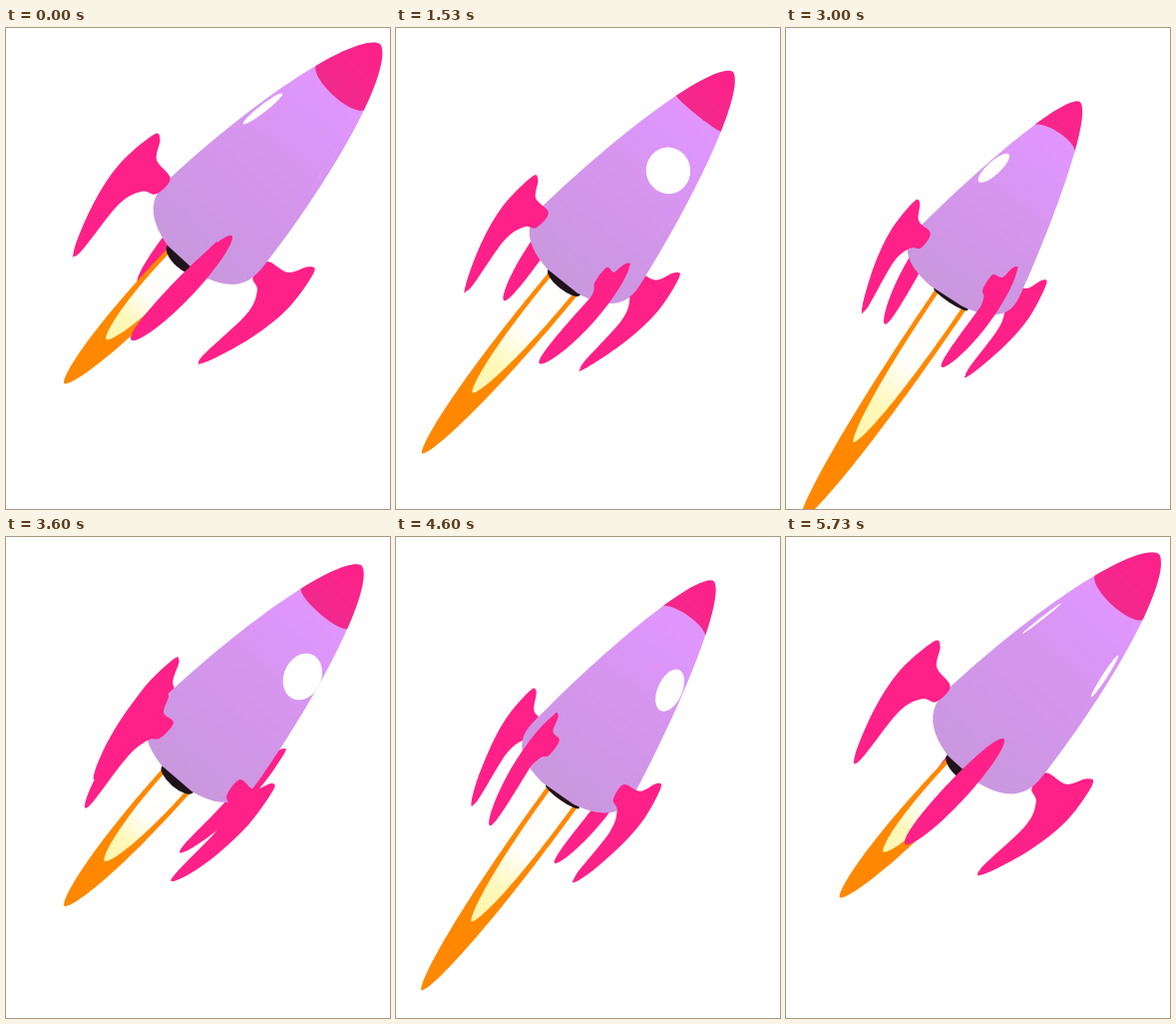
Write an HTML page with a canvas that moves like this. It is 385 by 482 pixels and loops after 5760 ms.

```html
<!DOCTYPE html>
<html lang="en">
<head>
<meta charset="utf-8">
<title>Rocket</title>
<style>
html, body { margin: 0; width: 100%; height: 100%; overflow: hidden; background: #fff; }
canvas { display: block; }
</style>
</head>
<body>
<canvas id="stage" width="385" height="482"></canvas>
<script>
const ctx = document.getElementById('stage').getContext('2d');
const { sin, cos, abs, sqrt, max, PI } = Math;
const LOOP = 5760, TURN = 1920, FLICKER = 240;
const BODY_LENGTH = 292, NOSE_START = 234, NOSE_RADIUS = 30;
const WINDOW_AT = 165, WINDOW_RADIUS = 24.5;
const PINK = '#ff2088';

// Key points of one fin: distance along the axis, distance from it
const FIN = [[51, 62], [56, 84], [73, 95], [72, 103], [30, 108], [-14, 101],
  [-59, 85], [-59, 78], [0, 82], [24, 74], [31, 62]];

function poseAt(time) {
  const w = time / TURN * 2 * PI;
  // first and second harmonic around a mean
  const wave = (mean, c1, s1, c2, s2) =>
    mean + c1 * cos(w) + s1 * sin(w) + c2 * cos(2 * w) + s2 * sin(2 * w);
  const nx = wave(170.4, 5.7, 2.5, 0.9, 0.7);
  const ny = wave(252.4, -18.2, -7.3, -2.4, 1.8);
  const tx = wave(338.5, 38.5, 15.5, -2, -1.5);
  const ty = wave(39, -25, -17.5, 2.2, 5);
  const tilt = 0.355 * cos(w) - 0.02;
  const spin = w - 1.5;
  return {
    nx, ny, tilt,
    nose: 0.95 + 0.125 * cos(w - 0.35),
    angle: Math.atan2(ny - ty, tx - nx),
    stretch: Math.hypot(tx - nx, ty - ny) / BODY_LENGTH,
    lean: 9 * tilt - 3,
    flame: wave(224, -26, 13, 0, 0) - 26 * cos(2 * PI * time / FLICKER),
    roll: spin - 0.05 * (1 - cos(4 * spin))
  };
}

// Axis coordinates to the stage
function place(p, along, across, turn = 0) {
  const c = cos(p.angle + turn), s = sin(p.angle + turn);
  return [p.nx + along * c + across * s, p.ny - along * s + across * c];
}

const onBody = (p, x, y) => place(p, x * p.stretch,
  y * (1 + (p.nose - 1) * x / NOSE_START) + p.lean * (1 - x / BODY_LENGTH));

// Half width of the hull, with a rounded base
function hull(f) {
  const base = max(0, 1 - f * BODY_LENGTH / 55);
  return 67 * Math.pow(1 - Math.pow(f, 1.4), 0.6) * sqrt(1 - 0.92 * base ** 3);
}

const plume = f => Math.pow(1 - Math.pow(f, 2.2), 0.6);

// Closed outline of a shape whose half width is given over 0..1
function spindle(width, map, n = 48) {
  const left = [], right = [];
  for (let i = 0; i <= n; i++) {
    const f = (1 - cos(PI * i / n)) / 2, w = width(f);
    left.push(map(f, -w));
    right.unshift(map(f, w));
  }
  polygon([...left, ...right]);
}

function polygon(pts) {
  ctx.beginPath();
  pts.forEach(q => ctx.lineTo(...q));
  ctx.closePath();
}

function smooth(pts) {
  const n = pts.length, at = i => pts[(i + n) % n];
  ctx.beginPath();
  ctx.moveTo(...pts[0]);
  for (let i = 0; i < n; i++) {
    const [a, b, c, d] = [at(i - 1), at(i), at(i + 1), at(i + 2)];
    ctx.bezierCurveTo(b[0] + (c[0] - a[0]) / 6, b[1] + (c[1] - a[1]) / 6,
      c[0] - (d[0] - b[0]) / 6, c[1] - (d[1] - b[1]) / 6, c[0], c[1]);
  }
  ctx.closePath();
}

function fill(color) {
  ctx.fillStyle = color;
  ctx.fill();
}

function gradient(from, to, stops) {
  const g = ctx.createLinearGradient(...from, ...to);
  stops.forEach(([at, color]) => g.addColorStop(at, color));
  return g;
}

function drawFin(p, az) {
  const size = 1 + (p.nose - 1) * 0.7, depth = 0.16 + 0.35 * p.tilt;
  const map = (x, r, side = 0) => place(p,
    size * (x - r * cos(az) * depth),
    size * (r * (sin(az) + 0.08 * cos(az)) + side) + p.lean);
  smooth(FIN.map(([x, r]) => map(x, r)));
  fill(PINK);
  // thickness of the blade, seen when the fin faces the viewer
  spindle(f => 21 * abs(cos(az)) * sqrt(f * (1 - f)),
    (f, side) => map(75 - 143 * f, 97 + 14 * f - 31 * f * f, side));
  fill(PINK);
}

function drawFlame(p) {
  const map = (f, y) => place(p, -f * p.flame, y, -0.019);
  const core = 0.645;
  spindle(f => 18.5 * plume(f), map);
  fill('#ff8800');
  spindle(f => 14 * plume(f), (f, y) => map(f * core, y));
  fill(gradient(map(0, 0), map(core, 0),
    [[0, '#ffffff'], [0.45, '#fffefa'], [0.75, '#fff8b8'], [1, '#fff6ae']]));
}

function drawNozzle(p) {
  ctx.beginPath();
  ctx.ellipse(p.nx, p.ny, max(2, 6.5 + 8 * p.tilt), 20.5, -p.angle, 0, 2 * PI);
  fill('#21131a');
}

function drawWindow(p, az) {
  const facing = cos(az) + 0.22 * p.tilt;
  if (facing <= 0) return;
  const pts = [];
  for (let i = 0; i < 40; i++) {
    const a = i / 40 * 2 * PI, dx = WINDOW_RADIUS * cos(a);
    pts.push(onBody(p, WINDOW_AT + dx,
      (41 - 0.17 * dx) * sin(az) + WINDOW_RADIUS * sin(a) * facing));
  }
  polygon(pts);
  fill('#fff');
}

function drawBody(p) {
  const map = (x, y) => onBody(p, x, y);
  ctx.save();
  spindle(hull, (f, y) => map(f * BODY_LENGTH, y));
  fill(gradient(map(0, 0), map(NOSE_START, 0),
    [[0, '#c998de'], [0.5, '#d495ec'], [1, '#e196ff']]));
  ctx.clip();
  drawWindow(p, p.roll);
  drawWindow(p, p.roll + PI);
  const rim = [];
  for (let i = -12; i <= 12; i++) {
    const a = i / 12 * PI / 2;
    rim.push(map(NOSE_START - p.tilt * 34 * cos(a), (NOSE_RADIUS + 1) * sin(a)));
  }
  polygon([...rim, map(310, 40), map(310, -40)]);
  fill(gradient(map(NOSE_START, 0), map(BODY_LENGTH, 0), [[0, '#f3288c'], [1, PINK]]));
  ctx.restore();
}

function draw(time) {
  const p = poseAt(time);
  ctx.fillStyle = '#fff';
  ctx.fillRect(0, 0, 385, 482);
  const fins = [0, 1, 2, 3].map(i => p.roll + 0.05 + i * PI / 2);
  const isBack = az => cos(az) < 0;
  fins.filter(isBack).forEach(az => drawFin(p, az));
  drawFlame(p);
  drawNozzle(p);
  drawBody(p);
  fins.filter(az => !isBack(az)).forEach(az => drawFin(p, az));
}

const start = performance.now();
function tick() {
  draw((performance.now() - start) % LOOP);
  requestAnimationFrame(tick);
}
tick();
</script>
</body>
</html>
```
